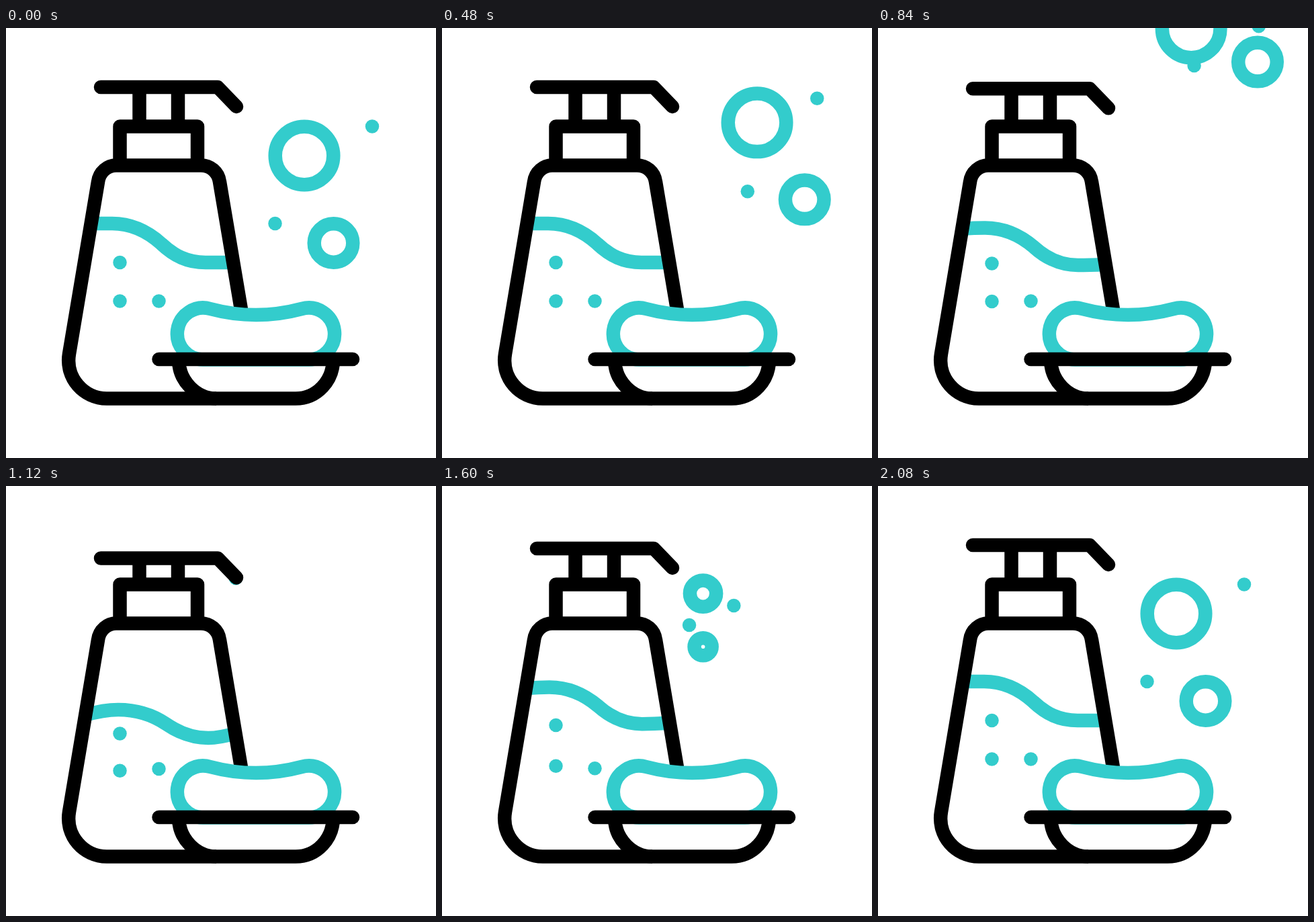
Recreate the animation shown at these times as an HTML page. Size 640x640 px, loop 2.32 s.

```html
<!DOCTYPE html>
<html lang="en">
<head>
<meta charset="utf-8">
<title>Soap dispenser</title>
<style>
  html, body { margin: 0; width: 100%; height: 100%; overflow: hidden; background: #fff; }
  svg { display: block; width: 100vw; height: 100vh; }
  path, circle { fill: none; stroke-width: 20.5; stroke-linejoin: round; }
  .ink { stroke: #000; }
  .foam { stroke: #3cc; }
  .round { stroke-linecap: round; }
  .dot { fill: #3cc; }
</style>
</head>
<body>
<svg viewBox="0 0 640 640">
  <path id="wave" class="foam"/>
  <g id="drops"></g>
  <path class="ink" d="M351 425L318 229C316 214 304 204.5 290 204.5H164C151 204.5 139 214 137 229L94 485C88 521 116 551.5 150 551.5H313"/>
  <path class="ink" d="M169.5 204V146.5H285V204"/>
  <g id="bubbles"></g>
  <path id="posts" class="ink"/>
  <path id="pump" class="ink round" d="M141 88H315L343 117"/>
  <path class="foam" d="M294 493.5A38.5 38.5 0 1 1 304 418C349 430 395 430 440 418A38.5 38.5 0 1 1 449 493.5Z"/>
  <path class="ink" d="M257 493C257 525 283 551.5 313 551.5H431C463 551.5 487 525 487 493"/>
  <path class="ink round" d="M227.5 493H516"/>
</svg>
<script>
const LOOP = 2320, STEP = 40, BIRTH = 1120, HALF = 10.25;
const $ = id => document.getElementById(id);

function make(tag, attrs, parent) {
  const el = document.createElementNS("http://www.w3.org/2000/svg", tag);
  for (const k in attrs) el.setAttribute(k, attrs[k]);
  if (parent) parent.append(el);
  return el;
}

function ease(u) {
  u = Math.min(1, Math.max(0, u));
  return u < .5 ? (2 * u) ** 2.2 / 2 : 1 - (2 - 2 * u) ** 2.2 / 2;
}

// One press: down and back up, shifted by a delay
const dip = (t, delay) => ease((t - 730 - delay) / 550) - ease((t - 1270 - delay) / 550);

// Ring radius (0 = solid dot), rise distance, paths out of the nozzle and off the top
const bubbles = [
  { r: 43.3, rise: 109, grow: "c34 -8 63 58 102 53", leave: "M444 190q33 -20 24.5 -102l-8 -300" },
  { r: 28.8, rise: 162, grow: "c30 43 55 187 145.5 183", leave: "M487.5 320q51 -25 74 -139l8 -300" },
  { r: 0, rise: 84, grow: "c38 32 160 78 203 9.5", leave: "M545 146.5q13 -24 19 -81.5l12 -300" },
  { r: 0, rise: 147, grow: "c29 33 24 116 58.5 154", leave: "M400.5 291q60 -3 67 -118.5l8 -300" }
].map(b => ({
  ...b,
  grow: make("path", { d: "M342 137" + b.grow }),
  leave: make("path", { d: b.leave }),
  el: make("circle", b.r ? { class: "foam" } : { class: "dot", r: HALF }, $("bubbles"))
}));

const drops = [[169.5, 349], [169.5, 406.5], [227.5, 406.5]].map(([cx, cy]) =>
  make("circle", { class: "dot", cx, cy, r: HALF }, $("drops")));

const calm = [126, 291, 137, 291, 147, 291, 158, 291, 186, 291, 211, 303, 231, 321,
  250, 339, 270, 349, 297, 349, 310, 349, 324, 349, 338, 349];
const sunk = [118, 341, 135, 336, 150, 333, 167, 333, 193, 333, 217, 340, 238, 354,
  257, 367, 279, 375, 301, 375, 314, 375, 328, 372, 342, 368];

function moveBubble(b, t) {
  const s = ease((t - 1160) / 920);
  const p = t < BIRTH
    ? b.leave.getPointAtLength(b.rise * (Math.max(0, t - 60) / 580) ** 2)
    : b.grow.getPointAtLength(b.grow.getTotalLength() * s);
  b.el.setAttribute("cx", p.x);
  b.el.setAttribute("cy", p.y);
  if (!b.r) return;
  // A ring smaller than its line keeps an inner hole
  const r = t < BIRTH ? b.r : b.r * s;
  b.el.setAttribute("r", Math.max(r, HALF));
  b.el.style.strokeWidth = 2 * Math.min(r, HALF);
}

function draw(now) {
  const t = Math.floor(now % LOOP / STEP) * STEP;
  const press = 21.6 * dip(t, -27), sink = 1.08 * dip(t, -45);
  $("pump").setAttribute("transform", `translate(0 ${press})`);
  $("posts").setAttribute("d", `M198.5 ${88 + press}V146M256 ${88 + press}V146`);
  const pts = calm.map((v, i) => v + (sunk[i] - v) * sink);
  $("wave").setAttribute("d", `M${pts.slice(0, 2)}C${pts.slice(2)}`);
  drops.forEach((d, i) => d.setAttribute("transform", `translate(0 ${23 * dip(t, 40 * i)})`));
  bubbles.forEach(b => moveBubble(b, t));
}

const start = performance.now();
function tick() {
  draw(performance.now() - start);
  requestAnimationFrame(tick);
}
tick();
</script>
</body>
</html>
```
